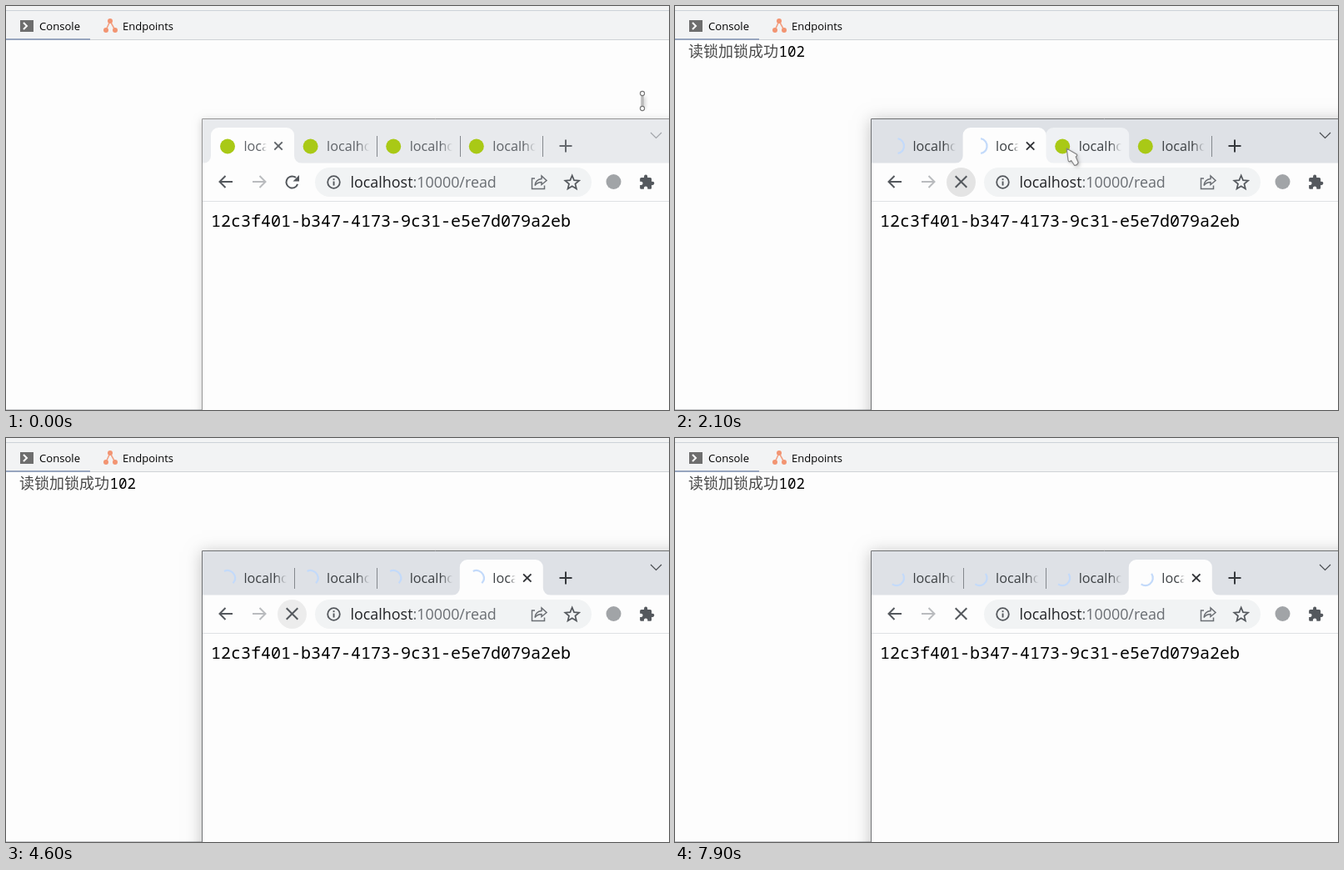
Write an HTML page with a canvas that moves like this. It is 796 px wide and 485 px high and loops after 8 s.

```html
<!DOCTYPE html>
<html lang="en">
<head>
<meta charset="utf-8">
<title>Read lock demo</title>
<style>
html, body { margin: 0; width: 100%; height: 100%; overflow: hidden; background: #fdfdfd; }
canvas { display: block; }
</style>
</head>
<body>
<canvas id="stage" width="796" height="485"></canvas>
<script>
const c = document.getElementById('stage').getContext('2d');
const LOOP = 8000, STEP = 100, TABS = 4;
const FOCUS = 200, FIRST_CLICK = 900, CYCLE = 1000;
const WHITE = '#fdfdfd', INK = '#54585d';
const UI = '"Open Sans", "Noto Sans", sans-serif';
const MONO = '"Noto Sans Mono", monospace';
const CJK = '"Noto Sans CJK SC", "Noto Sans CJK", sans-serif';
const PUZZLE = new Path2D('M20.5 11H19V7c0-1.1-.9-2-2-2h-4V3.5a2.5 2.5 0 0 0-5 0V5H4c-1.1 0-2 .9-2 2v3.8h1.5a2.7 2.7 0 0 1 0 5.4H2V20c0 1.1.9 2 2 2h3.8v-1.5a2.7 2.7 0 0 1 5.4 0V22H17c1.1 0 2-.9 2-2v-4h1.5a2.5 2.5 0 0 0 0-5z');
const ARROW = new Path2D('M0 0L12 7Q13.5 8.5 11 10L14 17Q13 20 9.5 20.5L5.5 14.5Q2.5 17.5 1.8 14Z');
const SHARE = new Path2D('M635 207H631.5V219.5H646.5V215.5M635 215.5Q636 208 643 207.5V204L649 209.5L643 214.5V211.5Q638 211.5 635 215.5');

const clamp = (v, lo = 0, hi = 1) => Math.min(hi, Math.max(lo, v));
const mix = (a, b, p) => a + (b - a) * p;
const ease = p => (p = clamp(p), p * p * (3 - 2 * p));
const tabX = i => 246 + 99.6 * i;

function line(color, width, ...pts) {
  c.strokeStyle = color;
  c.lineWidth = width;
  c.beginPath();
  for (let i = 0; i < pts.length; i += 2) c.lineTo(pts[i], pts[i + 1]);
  c.stroke();
}

function rect(color, x, y, w, h, r = 0) {
  c.fillStyle = color;
  c.beginPath();
  c.roundRect(x, y, w, h, r);
  c.fill();
}

function disc(color, x, y, r) {
  c.fillStyle = color;
  c.beginPath();
  c.arc(x, y, r, 0, 7);
  c.fill();
}

function arc(color, width, x, y, r, from = 0, to = 2 * Math.PI) {
  c.strokeStyle = color;
  c.lineWidth = width;
  c.beginPath();
  c.arc(x, y, r, from, to);
  c.stroke();
}

function text(str, x, y, font, color) {
  c.font = font;
  c.fillStyle = color;
  c.fillText(str, x, y);
}

function cross(x, y, r, color, width) {
  line(color, width, x - r, y - r, x + r, y + r);
  line(color, width, x - r, y + r, x + r, y - r);
}

// Each cycle: click reload, go to the next tab, select it, come back
function stateAt(t) {
  const k = Math.min(TABS - 1, Math.floor((t - FIRST_CLICK) / CYCLE));
  const u = t - FIRST_CLICK - k * CYCLE;
  const last = k === TABS - 1, loading = k + 1;
  const active = clamp(u < 500 ? k : k + 1, 0, TABS - 1);
  const pressed = k < 0 ? 0 : .15 * clamp((400 - u) / 300);
  const over = last ? t < 5000 : u >= 800;
  return {
    t, k, u, last, loading, active,
    focused: t >= FOCUS,
    hover: !last && u >= 200 && u < 500 ? k + 1 : -1,
    shade: Math.max(pressed, over ? .065 : 0),
    stop: active < loading && u > 100
  };
}

function drawConsole(t) {
  rect('#f2f3f4', 0, 0, 796, 40);
  line('#cdd2d8', 1, 0, 5.5, 796, 5.5);
  line('#cfd2d6', 1, 0, 40.5, 796, 40.5);
  rect('#97a5bf', 0, 39, 101, 2);
  rect('#6e6e6e', 17, 17, 16, 14);
  line(WHITE, 2, 21, 20, 25, 24, 21, 28);
  const nodes = [120, 29, 125, 18, 131, 29];
  line('#f2a184', 1.6, ...nodes);
  for (let i = 0; i < 6; i += 2) disc('#f29472', nodes[i], nodes[i + 1], 3);
  text('Console', 40, 29, '13.1px ' + UI, '#000');
  text('Endpoints', 140, 29, '13px ' + UI, '#000');
  line('#c6c8ca', 1, 0, 484.5, 236, 484.5);
  if (t > FIRST_CLICK + 100) {
    text('读锁加锁成功', 16, 61, '18px ' + CJK, '#484848');
    text('102', 124.5, 61, '17.5px ' + MONO, '#000');
  }
}

function tabShape(color, x) {
  const r = 9, right = x + 100;
  c.fillStyle = color;
  c.beginPath();
  c.moveTo(x - r, 189);
  c.arcTo(x, 189, x, 180, r);
  c.arcTo(x, 146, x + r, 146, r);
  c.arcTo(right, 146, right, 155, r);
  c.arcTo(right, 189, right + r, 189, r);
  c.lineTo(right + r, 189);
  c.fill();
}

function drawTab(i, { t, focused, active, hover, loading }) {
  const x = tabX(i), on = i === active, width = on ? 27 : 51;
  if (on) tabShape(WHITE, x);
  else if (i === hover) tabShape('#eff1f4', x);

  if (i < loading) {
    const mid = -.3026 * (t - 2100) * Math.PI / 180;
    arc('#c3dafa', 2.2, x + 20, 168, 9, mid - 1.4, mid + 1.4);
  } else disc('#a9c916', x + 20, 168.5, 9);

  const fade = c.createLinearGradient(x + 40, 0, x + 40 + width, 0);
  const rgb = focused ? '60,64,67' : '95,99,104';
  fade.addColorStop(.72, `rgb(${rgb})`);
  fade.addColorStop(1, `rgba(${rgb},0)`);
  text('localhost', x + 39.5, 174, '16.2px ' + UI, fade);

  if (on) cross(x + 81, 168, 4.7, focused ? '#303236' : '#5f6368', 1.9);
  const lit = n => n === active || n === hover;
  if (!lit(i) && !lit(i + 1)) {
    const sep = Math.round(tabX(i + 1)) + .5;
    line('#84888d', 1, sep, 156, sep, 181);
  }
}

function drawToolbar({ shade, stop }) {
  const arrow = (color, tail, tip) => {
    line(color, 2, tail, 211, tip, 211);
    const back = tip + 7 * Math.sign(tail - tip);
    line(color, 2, back, 204, tip, 211, back, 218);
  };
  if (shade) disc(`rgba(0,0,0,${shade})`, 343.5, 211.5, 17.5);
  arrow(INK, 272, 256.5);
  arrow('#b9bbbe', 296, 311.5);
  if (stop) cross(343.5, 211, 6.8, INK, 2);
  else {
    arc(INK, 2, 343.5, 211.5, 7, .35, 5.4);
    c.fillStyle = INK;
    c.fill(new Path2D('M352 203V210.5H344.5Z'));
  }

  rect('#f1f3f4', 371, 194, 332, 35, 17.5);
  arc(INK, 1.8, 393.5, 211.5, 7.3);
  rect(INK, 392.6, 210.5, 1.9, 5);
  rect(INK, 392.6, 207.2, 1.9, 1.9);
  const font = '17.9px ' + UI;
  text('localhost', 413.5, 218, font, '#202124');
  text(':10000/read', 413.5 + c.measureText('localhost').width, 218, font, '#6a6e73');

  c.strokeStyle = '#6b6f74';
  c.lineWidth = 1.5;
  c.stroke(SHARE);
  const star = [];
  for (let i = 0; i < 12; i++) {
    const a = i * Math.PI / 5 - Math.PI / 2, r = i % 2 ? 3.9 : 8.8;
    star.push(679.7 + r * Math.cos(a), 212.3 + r * Math.sin(a));
  }
  line(INK, 1.7, ...star);

  disc('#a1a4a7', 729.5, 211, 9);
  c.save();
  c.translate(759.5, 201.8);
  c.scale(.82, .82);
  c.fillStyle = INK;
  c.fill(PUZZLE);
  c.restore();
}

function drawBrowser(state) {
  const { focused, active } = state;
  c.save();
  c.shadowColor = `rgba(0,0,0,${focused ? .24 : .18})`;
  c.shadowBlur = focused ? 18 : 9;
  c.shadowOffsetY = 2;
  rect(WHITE, 235, 135, 600, 400);
  c.restore();
  rect(focused ? '#dee1e6' : '#e8eaed', 236, 136, 560, 53);
  // The active tab lies on top
  for (let i = 0; i < TABS; i++) if (i !== active) drawTab(i, state);
  drawTab(active, state);
  rect(WHITE, 236, 188.5, 560, 46);
  const dark = focused ? '#35383c' : '#65696e';
  line(dark, 2, 664.5, 168, 679.5, 168);
  line(dark, 2, 672, 160.5, 672, 175.5);
  line(focused ? '#45484c' : '#a0a3a8', 1.1, 774, 152, 780.5, 158.5, 787, 152);
  drawToolbar(state);
  line('#dfe1e4', 1, 236, 234.5, 796, 234.5);
  text('12c3f401-b347-4173-9c31-e5e7d079a2eb', 246, 265, '20px ' + MONO, '#000');
  line(focused ? '#707274' : '#969696', 1, 235.5, 485, 235.5, 135.5, 796, 135.5);
}

function pointerAt({ t, k, u, last }) {
  const home = 346 + 4.5 * Math.max(k, 0);
  if (k < 0) {
    // Swoop in from the right along a quadratic curve
    const p = ease((t - 100) / 700), q = 1 - p;
    const curve = (a, b, d) => q * q * a + 2 * q * p * b + p * p * d;
    return [curve(764, 505, home), curve(114, 299, 216)];
  }
  if (last) return [home, mix(216, 234, ease((u - 200) / 300))];
  const away = u < 500 ? ease((u - 100) / 100) : 1 - ease((u - 500) / 300);
  const from = u < 500 ? home : home + 4.5;
  return [mix(from, tabX(k + 1) + 25, away), mix(216, 171, away)];
}

function drawPointer(state) {
  if (state.last && state.u > 500) return;
  c.save();
  c.shadowColor = 'rgba(0,0,0,.25)';
  c.shadowBlur = 4;
  c.shadowOffsetX = c.shadowOffsetY = 2;
  if (!state.focused) {
    line('#777', 2.6, 764, 107, 764, 121);
    c.shadowColor = 'transparent';
    line(WHITE, 1, 764, 107, 764, 121);
    for (const y of [105, 123]) {
      disc(WHITE, 764, y, 2.6);
      arc('#777', 1.1, 764, y, 2.6);
    }
  } else {
    c.translate(...pointerAt(state));
    c.fillStyle = '#f6f6f6';
    c.strokeStyle = '#858585';
    c.lineWidth = 1.2;
    c.lineJoin = 'round';
    c.fill(ARROW);
    c.shadowColor = 'transparent';
    c.stroke(ARROW);
  }
  c.restore();
}

function draw() {
  const t = Math.floor(performance.now() % LOOP / STEP) * STEP;
  const state = stateAt(t);
  rect(WHITE, 0, 0, 796, 485);
  drawConsole(t);
  drawBrowser(state);
  drawPointer(state);
  requestAnimationFrame(draw);
}
draw();
</script>
</body>
</html>
```
